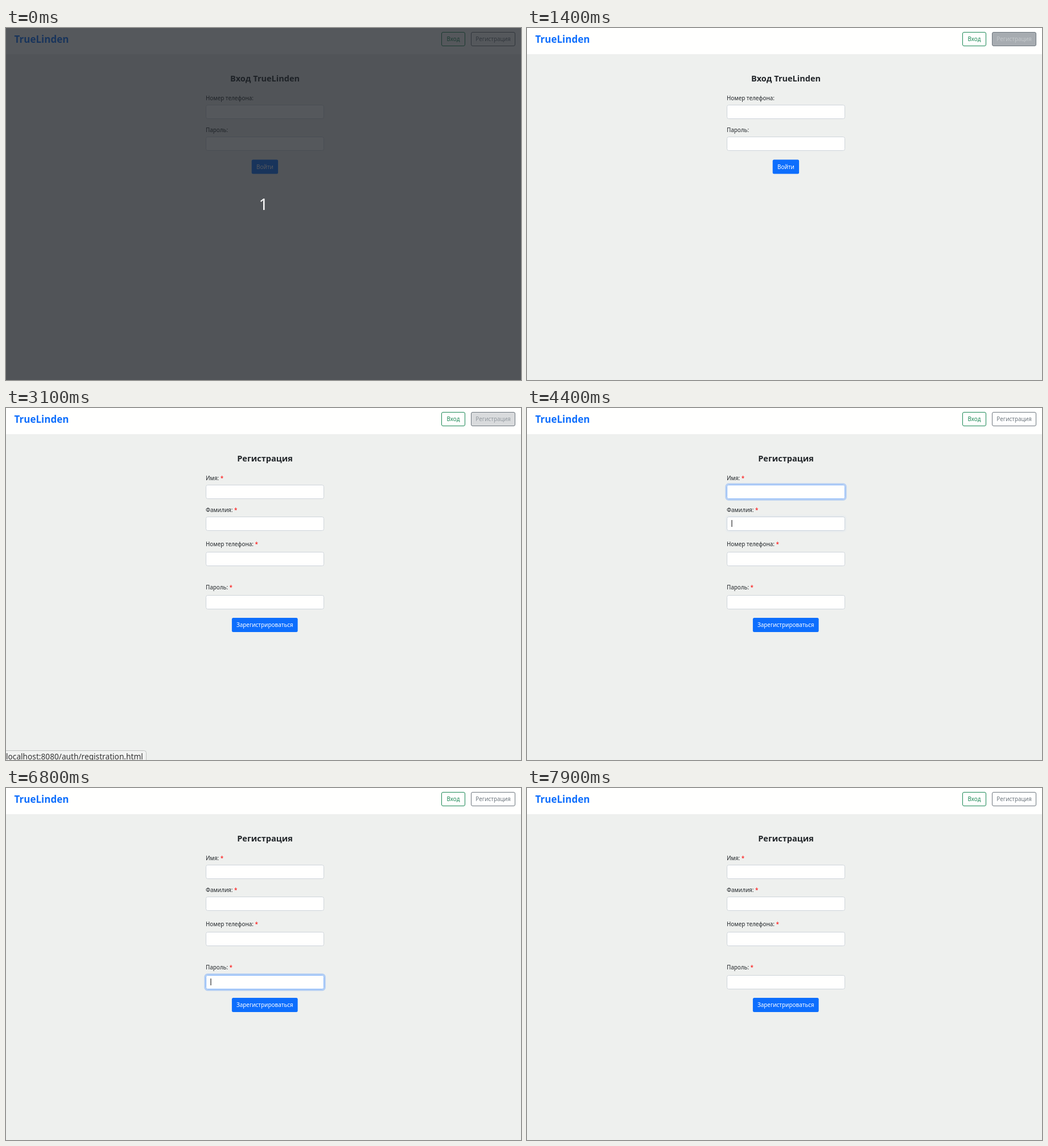
An HTML page that plays this animation: 905 px wide and 619 px high, repeating every 8 s.

```html
<!DOCTYPE html>
<html lang="ru">
<head>
<meta charset="utf-8">
<title>TrueLinden</title>
<style>
  html, body { margin: 0; width: 100%; height: 100%; overflow: hidden; background: #eef0ee; }
  svg { display: block; width: 100vw; height: 100vh; font: 500 9.9px "Noto Sans", "Open Sans", sans-serif; fill: #212529; }
  .brand { font-size: 17px; font-weight: 700; fill: #0d6efd; }
  .title { font-size: 14.5px; font-weight: 700; }
  .system { font-size: 13.8px; fill: #000; }
  .status { font-size: 13.7px; font-weight: 400; fill: #333; }
  .hint { font-size: 11px; font-weight: 400; fill: #6a6a72; }
  .count { font-size: 28px; font-weight: 400; fill: #fff; }
  .middle { text-anchor: middle; }
  .popup { fill: #fffffe; stroke: #bfc1c0; filter: drop-shadow(0 1px 1.5px #0003); }
</style>
</head>
<body>
<svg id="stage" viewBox="0 0 905 619"></svg>
<script>
const LOOP = 8000, TICK = 100, FADE = 150;
const BLUE = '#0d6efd', GREEN = '#198754';
const GREY = [108, 117, 125], WHITE = [255, 255, 255];
const BORDER = [206, 212, 218], FOCUS_BORDER = [134, 183, 254];
const PHONES = ['+70000001234', '+7000000567', '+70000008901', '+70000002345'];

const LOGIN_FIELDS = [
  { label: 'Номер телефона:', baseline: 126.7, top: 135 },
  { label: 'Пароль:', baseline: 182.5, top: 191 },
];
const SIGNUP_FIELDS = [
  { label: 'Имя:', baseline: 126.7, top: 135, focus: [3790, 4390] },
  { label: 'Фамилия:', baseline: 182.5, top: 191, focus: [4390, 4990] },
  { label: 'Номер телефона:', baseline: 243.3, top: 253, focus: [4990, 6090] },
  { label: 'Пароль:', baseline: 319, top: 329, focus: [6590, 7720] },
];

const ramp = (t, start, length = FADE) => Math.min(1, Math.max(0, (t - start) / length));
const pulse = (t, on, off, fadeIn, fadeOut) => ramp(t, on, fadeIn) - ramp(t, off, fadeOut);
const within = (t, start, end) => t >= start && t < end;
const rgb = channels => `rgb(${channels.map(Math.round)})`;
const mix = (a, b, p) => rgb(a.map((v, i) => v + (b[i] - v) * p));

const rect = (x, y, w, h, attrs) => `<rect x="${x}" y="${y}" width="${w}" height="${h}" ${attrs}/>`;
const text = (x, y, content, cls = '', attrs = '') =>
  `<text x="${x}" y="${y}" class="${cls}" ${attrs}>${content}</text>`;

function outlineButton(x, w, label, stroke, fill, color) {
  return rect(x, 7.5, w, 24, `rx="2.5" fill="${fill}" stroke="${stroke}"`) +
    text(x + w / 2, 23, label, 'middle', `fill="${color}"`);
}

function submitButton(x, y, w, label) {
  return rect(x, y, w, 25, `rx="2.5" fill="${BLUE}"`) +
    text(x + w / 2, y + 16, label, 'middle', 'fill="#fff"');
}

function field({ label, baseline, top, focus }, t, required) {
  const glow = focus ? pulse(t, ...focus) : 0;
  const star = required ? ' <tspan fill="#f00">*</tspan>' : '';
  const ring = rect(349.7, top - 1.3, 210.6, 27.6,
    `rx="4.5" fill="none" stroke="${BLUE}" stroke-width="2.7" stroke-opacity="${0.27 * glow}"`);
  const box = rect(351.5, top + 0.5, 207, 24,
    `rx="3" fill="#fffffe" stroke="${mix(BORDER, FOCUS_BORDER, glow)}"`);
  const caret = focus && within(t, ...focus) ? rect(359.5, top + 6, 1, 12, 'fill="#000"') : '';
  return text(351, baseline, label + star) + ring + box + caret;
}

function header(t) {
  const hover = t < 2500 ? ramp(t, 1310) : pulse(t, 2550, 2989);
  return rect(0, 0, 905, 46, 'fill="#fffffe"') +
    text(14.5, 26, 'TrueLinden', 'brand') +
    outlineButton(765.5, 41, 'Вход', GREEN, 'none', GREEN) +
    outlineButton(817.5, 77, 'Регистрация', rgb(GREY),
      mix(WHITE, GREY, hover), mix(GREY, WHITE, hover));
}

const loginPage = t =>
  text(455, 94, 'Вход TrueLinden', 'title middle') +
  LOGIN_FIELDS.map(f => field(f, t, false)).join('') +
  submitButton(431.7, 231.6, 46.4, 'Войти');

const signupPage = t =>
  text(455, 94, 'Регистрация', 'title middle') +
  SIGNUP_FIELDS.map(f => field(f, t, true)).join('') +
  submitButton(396.9, 369, 115.7, 'Зарегистрироваться');

function phonePopup(t) {
  if (!within(t, 5100, 6100)) return '';
  const highlight = within(t, 5200, 5600) ? rect(353, 339, 204, 20, 'fill="#e0e0e6"') : '';
  return rect(351.5, 277.5, 207, 85, 'rx="5" class="popup"') + highlight +
    PHONES.map((phone, i) => text(358, 297 + i * 19.25, phone, 'system')).join('');
}

function passwordPopup(t) {
  if (!within(t, 7000, 7800)) return '';
  const rows = PHONES.slice(0, 2).map((phone, i) => {
    const y = 375 + i * 43;
    return `<path d="M371 ${y}h9v3m-3-3v3" fill="none" stroke="#5b5b66" stroke-width="1.5"/>` +
      `<circle cx="368" cy="${y}" r="3" fill="none" stroke="#5b5b66" stroke-width="1.5"/>` +
      text(390, y + 1, phone, 'system') + text(390, y + 17, 'С этого сайта', 'hint');
  }).join('');
  return `<g opacity="${ramp(t, 6950, 100)}">` +
    rect(352.5, 354.5, 308, 123, 'rx="5" class="popup"') + rows +
    rect(353, 445, 307, 1, 'fill="#d4d4d8"') +
    text(506, 467, 'Управление паролями', 'system middle') + '</g>';
}

function statusBar(t) {
  const opacity = t < 2500 ? ramp(t, 1550, 120) : pulse(t, 2650, 3290, 120, 200);
  return `<g opacity="${opacity}">` +
    rect(-5, 602.5, 251.5, 25, 'rx="4" fill="#f2f3f2" stroke="#bfc1c0"') +
    text(0, 618, 'localhost:8080/auth/registration.html', 'status') + '</g>';
}

const countdown = t => t >= 100 ? '' :
  rect(0, 0, 905, 619, 'fill="rgb(28,32,38)" fill-opacity=".75"') +
  text(452.5, 320, '1', 'count middle');

const stage = document.getElementById('stage');
let shown = -1;

function draw(now) {
  const t = Math.floor(now % LOOP / TICK) * TICK;
  if (t !== shown) {
    shown = t;
    stage.innerHTML = rect(0, 0, 905, 619, 'fill="#eef0ee"') + header(t) +
      (t < 2500 ? loginPage(t) : signupPage(t)) +
      phonePopup(t) + passwordPopup(t) + statusBar(t) + countdown(t);
  }
}

const start = performance.now();
function loop() {
  draw(performance.now() - start);
  requestAnimationFrame(loop);
}
loop();
</script>
</body>
</html>
```
